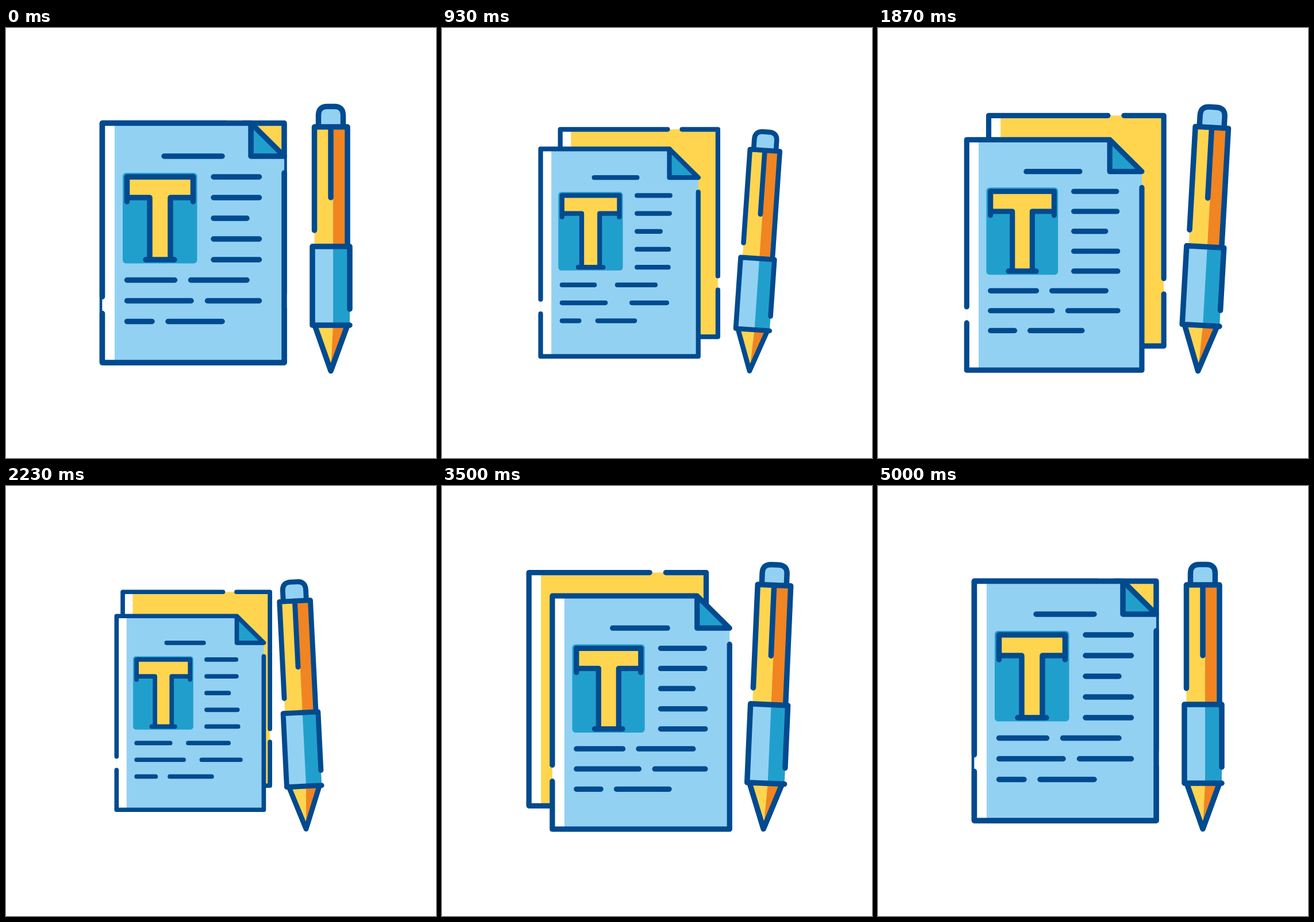
An HTML page that plays this animation: 748 px wide and 748 px high, repeating every 5.03 s.

```html
<!DOCTYPE html>
<html>
<head>
<meta charset="utf-8">
<style>
  html, body { margin: 0; width: 100%; height: 100%; overflow: hidden; background: #fff; }
  svg { display: block; width: 100vw; height: 100vh; }
  .ink { fill: none; stroke: #004a8f; stroke-width: 9.5; stroke-linecap: round; stroke-linejoin: round; }
  .sky { fill: #93d1f3; }
  .teal { fill: #219fcc; }
  .sun { fill: #ffd550; }
  .orange { fill: #f08522; }
  .white { fill: #fff; }
</style>
</head>
<body>
<svg viewBox="0 0 748 748">
  <g id="back">
    <path class="sun" d="M167.5 165.5H484V582H167.5z"/>
    <path class="white" d="M167.5 165.5H189V582H167.5z"/>
    <path class="ink" d="M383 165.5H167.5V582H484V488M484 460V165.5H412"/>
  </g>
  <g id="front">
    <path class="sky" d="M167.5 165.5H426L484 223V582H167.5z"/>
    <path class="white" d="M167.5 165.5H189V582H167.5z"/>
    <path class="teal" d="M426 165.5V223H484z"/>
    <path class="ink" d="M167.5 467.5V165.5H426L484 223H426V165.5M484 252V582H167.5V496.5"/>
    <rect class="teal" x="203" y="252" width="129.5" height="157.5" rx="6"/>
    <path class="sun" d="M210.5 259H325.5V295H286V403H250V295H210.5z"/>
    <path class="ink" d="M210.5 302V259H325.5V302M210.5 295H250V403M325.5 295H286V403M243 403H293"/>
    <path class="ink" id="lines"/>
  </g>
  <g id="pen">
    <path class="sky" d="M543.5 172V152Q543.5 136.5 559 136.5H571Q586.5 136.5 586.5 152V172z"/>
    <path class="ink" d="M543.5 172V152Q543.5 136.5 559 136.5H571Q586.5 136.5 586.5 152V172"/>
    <path class="sun" d="M536.5 172H594V380H536.5z"/>
    <path class="orange" d="M569 172H594V380H569z"/>
    <path class="ink" d="M536.5 352V172H594V380M565 172V295"/>
    <path class="sun" d="M537 517H594L565 597z"/>
    <path class="orange" d="M569 517H594L565 597z"/>
    <path class="ink" d="M537 517L565 596.5L594 517"/>
    <path class="sky" d="M533 380H598V517H533z"/>
    <path class="teal" d="M569 380H598V517H569z"/>
    <path class="ink" d="M598 489V380H533V517H598"/>
  </g>
</svg>
<script>
const LOOP = 5030, CX = 325.7, CY = 373.8;
const $ = id => document.getElementById(id);
const clamp = u => Math.max(0, Math.min(1, u));

// Text lines as x, y, length, in the order they shrink
const rows = [
  [275, 223, 101],
  [361, 259, 79.5], [361, 295, 79.5], [361, 331, 58], [361, 367, 79.5], [361, 403, 79.5],
  [210.5, 438.5, 83], [321.5, 438.5, 97.5],
  [210.5, 474.5, 111.5], [350.5, 474.5, 90],
  [210.5, 510.5, 43.5], [282, 510.5, 94]
];

const smooth = u => (u = clamp(u)) * u * (3 - 2 * u);

// cubic-bezier(.42, 0, .58, 1)
function ease(u) {
  u = clamp(u);
  let lo = 0, hi = 1;
  for (let i = 0; i < 20; i++) {
    const s = (lo + hi) / 2, r = 1 - s;
    if (1.26 * s * r * r + 1.74 * s * s * r + s * s * s < u) lo = s; else hi = s;
  }
  return smooth(lo);
}

// Rises from 0 to 1 and falls back, 20 steps each way
const hill = (f, p, start) => f((p - start) / 20) - f((p - start - 20) / 20);

function place(id, dx, dy, scale) {
  $(id).setAttribute("transform",
    `translate(${CX + dx} ${CY + dy}) scale(${scale}) translate(${-CX} ${-CY})`);
}

function draw(now) {
  const n = Math.floor((now % LOOP) * 0.03 + 0.15); // 30 steps a second
  const p = n % 50;
  const out = ease(n / 40), across = ease((n - 50) / 40), home = ease((n - 100) / 40);
  const dx = 21 * (2 * across - out - home), dy = 21 * (out - home);
  const near = hill(ease, p, 0), scale = 1 - 0.2 * near;
  place("back", -dx, -dy, scale);
  place("front", dx, dy, scale);

  $("lines").setAttribute("d", rows.map(([x, y, len], i) =>
    `M${x} ${y}h${len * (1 - 0.22 * hill(ease, p, i))}`).join(""));

  const tilt = 5 * smooth(p / 10) - 10 * smooth((p - 10) / 10)
    + 10 * smooth((p - 20) / 10) - 5 * smooth((p - 30) / 10);
  const size = 1 - 0.1 * hill(smooth, p, 5);
  $("pen").setAttribute("transform",
    `translate(${565 - 45 * near} 597) rotate(${tilt}) scale(${size}) translate(-565 -597)`);
}

const begin = performance.now();
(function tick() {
  draw(performance.now() - begin);
  requestAnimationFrame(tick);
})();
</script>
</body>
</html>
```
